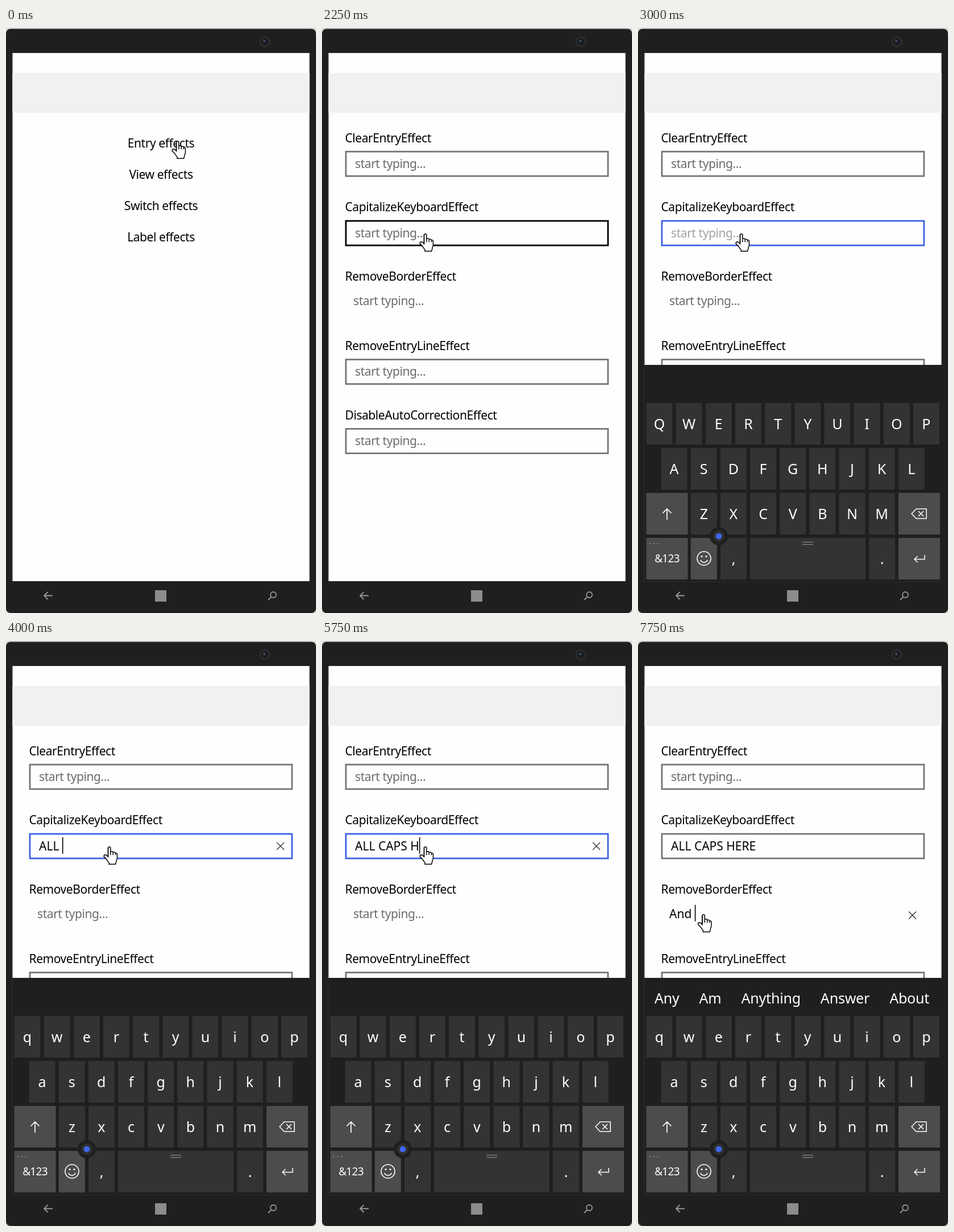
Write an HTML page with a canvas that moves like this. It is 545 by 1028 pixels and loops after 8 s.

```html
<!DOCTYPE html>
<html lang="en">
<head>
<meta charset="utf-8">
<title>Entry effects</title>
<style>
html, body { margin: 0; width: 100%; height: 100%; overflow: hidden; background: #d6d6d6; }
canvas { display: block; }
</style>
</head>
<body>
<canvas id="stage" width="545" height="1028"></canvas>
<script>
const ctx = document.getElementById('stage').getContext('2d');
const LOOP = 8000, STEP = 250;
const BODY = '#1f1f1f', GRAY = '#767676', BLUE = '#3d62e5', HINT = 'start typing...';
const MENU = ['Entry', 'View', 'Switch', 'Label'].map(s => s + ' effects');
const FIELDS = ['ClearEntry', 'CapitalizeKeyboard', 'RemoveBorder', 'RemoveEntryLine', 'DisableAutoCorrection']
  .map(s => s + 'Effect');
const PITCH = 121.8;

// Cursor path: step, x, y
const PATH = [[0, 291.5, 198], [5, 299, 207], [6, 299, 207], [9, 171.5, 361], [25, 171.5, 361], [27, 105, 480], [32, 105, 480]];
const HAND = new Path2D('M5.5 1.5L6.5 .5H7.5L8.5 1.5V6H10.5L11.5 7H13.5L14.5 8H15.5L16.5 9V15L15.5 17V18L14.5 21.5H6.5V19.5L5.5 18.5L3.5 15.5L.5 12.5V11L1.5 10.2L3.5 10.5L5.5 12.5Z');
const KNUCKLES = new Path2D('M5.5 1.5V12.5M8.5 6V10.5M11.5 7V10.5M14.5 8V10.5');

const clamp = (v, a, b) => Math.max(a, Math.min(b, v));

function rect(x, y, w, h, color) {
  ctx.fillStyle = color;
  ctx.fillRect(x, y, w, h);
}

function disc(x, y, r, color) {
  ctx.fillStyle = color;
  ctx.beginPath();
  ctx.arc(x, y, r, 0, 7);
  ctx.fill();
}

function line(d, color, width = 1.5) {
  ctx.strokeStyle = color;
  ctx.lineWidth = width;
  ctx.stroke(new Path2D(d));
}

function font(size, spacing) {
  ctx.font = `${size}px "Noto Sans", "Open Sans", sans-serif`;
  ctx.letterSpacing = spacing + 'px';
}

function text(s, x, y, color = '#000', size = 21, spacing = -0.43, align = 'left') {
  font(size, spacing);
  ctx.textAlign = align;
  ctx.fillStyle = color;
  ctx.fillText(s, x, y);
}

function drawBody() {
  rect(0, 0, 545, 1028, '#d6d6d6');
  ctx.fillStyle = BODY;
  ctx.beginPath();
  ctx.roundRect(0, 1.5, 545, 1026.5, 8);
  ctx.fill();
  disc(455, 24, 10, '#292929');
  disc(455, 24, 6, '#191b20');
  disc(454, 23, 2, '#3c5468');
  ctx.strokeStyle = '#303030';
  ctx.lineWidth = 1;
  ctx.strokeRect(10.5, 43.5, 523, 929.5);
  rect(11.5, 44, 522, 928, '#fefefe');
  rect(11.5, 79, 522, 70, '#f1f1f1');
  line('M82 997.5H67M73.5 991L67 997.5L73.5 1004', '#999', 1.8);
  rect(262, 988, 20, 20, '#8c8c8c');
  line('M466 1000L461 1005', '#999', 2);
  line('M475 996a5 5 0 1 1-10 0a5 5 0 1 1 10 0', '#999', 1.8);
}

function drawField(i, { value, focus, hover }) {
  const plain = i === 2;
  const top = 216 + i * PITCH, x = plain ? 55 : 58;
  const base = top + (plain ? 27 : 30);
  text(FIELDS[i], 40.5, top - 15.5);
  if (!plain) {
    ctx.strokeStyle = focus ? BLUE : hover ? '#000' : GRAY;
    ctx.lineWidth = 2.8;
    ctx.strokeRect(42, top + 1.2, 460.8, 43);
  }
  if (value) text(value, x, base, '#000', 21, 0);
  else text(HINT, x, base, focus ? '#a3a3a3' : '#6b6b6b');
  if (focus && value) {
    font(21, 0);
    rect(x + ctx.measureText(value).width, base - 23, 1.6, 29, '#000');
    const y = plain ? 482 : 360.5;
    line(`M476 ${y - 6.5}l13 13m0 -13l-13 13`, '#333', 1.4);
  }
}

function drawPage(n) {
  const first = 'ALL CAPS HERE'.slice(0, clamp(n - 12 - (n > 20), 0, 13));
  const second = 'And '.slice(0, [0, 1, 2, 4][clamp(n - 28, 0, 3)]);
  ctx.save();
  if (n === 5) {
    ctx.globalAlpha = 0.87;
    ctx.translate(0, 8.8);
  }
  FIELDS.forEach((_, i) => drawField(i, {
    value: i === 1 ? first : i === 2 ? second : '',
    focus: i === 1 ? n > 9 && n < 28 : i === 2 && n > 27,
    hover: i === 1 && n === 9
  }));
  ctx.restore();
}

function key(x, y, label, w = 46, color = '#333') {
  rect(x, y, w, 73, color);
  if (label) text(label, x + w / 2, y + 45.5, '#fff', 25, 0, 'center');
}

function suggestions(n) {
  if (n === 20 || n === 21) return 'CAP CAPE CAPITAL CAPTAIN CARE';
  if (n > 23 && n < 28) return "HER HERE'S NEED GREEN BELTRY";
  if (n === 30) return 'And Any Another Answer About';
  if (n === 31) return 'Any Am Anything Answer About';
  return '';
}

function drawKeyboard(n) {
  const caps = n < 13 || n === 28;
  const row = (letters, x, y) => [...letters].forEach((c, i) =>
    key(x + i * 52.15, y, caps ? c : c.toLowerCase()));
  const wide = (x, y, w = 73) => key(x, y, '', w, '#4c4c4c');

  ctx.save();
  ctx.beginPath();
  ctx.rect(11, 44, 523, 928.5);
  ctx.clip();
  if (n === 10) ctx.translate(0, 60);
  rect(11, 592, 523, 381, BODY);

  const words = suggestions(n).split(' ');
  font(25, -0.2);
  ctx.textAlign = 'left';
  let x = 29 + ctx.measureText(words[0]).actualBoundingBoxLeft;
  for (const word of words) {
    text(word, x, 637, '#fff', 25, -0.2);
    x += ctx.measureText(word).width + 35;
  }

  row('QWERTYUIOP', 14.5, 659);
  row('ASDFGHJKL', 40.5, 738);
  row('ZXCVBNM', 92.8, 817);
  wide(14.5, 817);
  wide(458, 817);
  wide(14.5, 896);
  wide(92.8, 896, 46);
  wide(458, 896);
  key(145, 896, ',');
  key(197, 896, '', 203);
  key(406, 896, '.');

  const white = '#fff';
  line('M51 864V845M43.5 852.5L51 845L58.5 852.5', white, 1.7);
  line('M481 853.5L489 845H507V862H489ZM493 849l9 9m0 -9l-9 9', white);
  line('M504 926V933.5H486M491.5 928L486 933.5L491.5 939', white);
  line('M128 932a12 12 0 1 1-24 0a12 12 0 1 1 24 0M109.5 935Q116 943.5 122.5 935', white, 1.6);
  disc(112, 928.5, 1.6, white);
  disc(120, 928.5, 1.6, white);
  text('&123', 51, 939, white, 19, -0.7, 'center');
  for (const dx of [20.5, 27.5, 34.5]) disc(dx, 906, 1.1, '#999');
  line('M289 903.5H308M289 907.5H308', '#999', 1.2);
  disc(142, 893, 16, BODY);
  disc(142, 893, 10, '#303030');
  disc(142, 893, 5.3, '#3f66ee');
  ctx.restore();
}

function drawCursor(n) {
  const k = PATH.findIndex(p => p[0] > n);
  const [a, b] = [PATH[k - 1], PATH[k]];
  const f = (n - a[0]) / (b[0] - a[0]);
  ctx.save();
  ctx.translate(a[1] + (b[1] - a[1]) * f, a[2] + (b[2] - a[2]) * f);
  ctx.scale(1.45, 1.45);
  ctx.fillStyle = '#fff';
  ctx.strokeStyle = '#000';
  ctx.lineWidth = 1;
  ctx.fill(HAND);
  ctx.stroke(HAND);
  ctx.stroke(KNUCKLES);
  ctx.restore();
}

function draw(now) {
  const n = Math.floor((now % LOOP) / STEP);
  drawBody();
  if (n < 4) MENU.forEach((s, i) => text(s, 272.5, 209.5 + i * 55, '#000', 21, -0.43, 'center'));
  if (n > 4) drawPage(n);
  if (n > 9) drawKeyboard(n);
  drawCursor(n);
}

let start;
function tick(now) {
  start ??= now;
  draw(now - start);
  requestAnimationFrame(tick);
}
draw(0);
requestAnimationFrame(tick);
</script>
</body>
</html>
```
